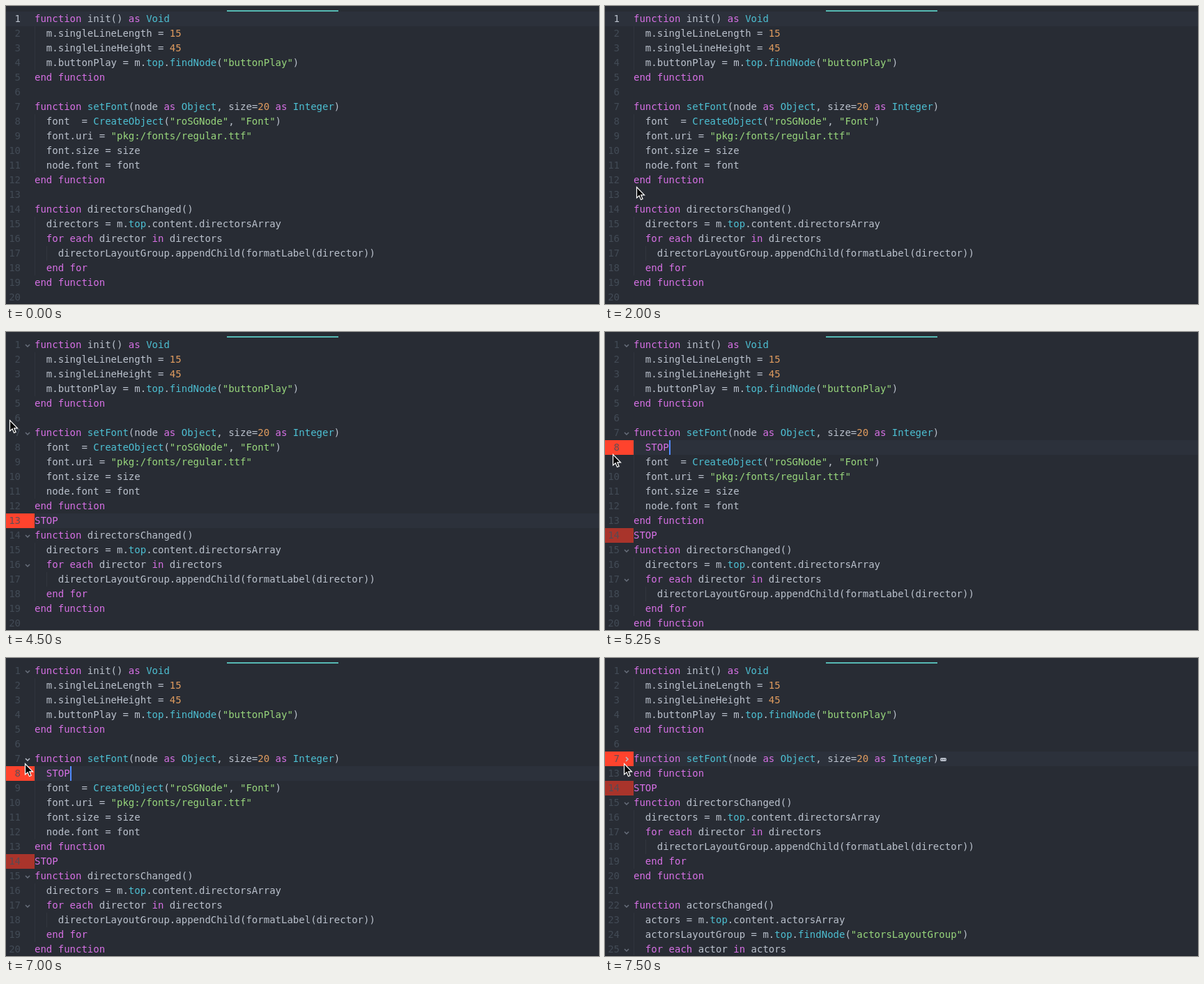
Recreate the animation shown at these times as an HTML page with a canvas. Size 851x427 px, loop 8000 ms.

```html
<!DOCTYPE html>
<html lang="en">
<head>
<meta charset="utf-8">
<title>Editor breakpoints</title>
<style>
  html, body { margin: 0; width: 100%; height: 100%; overflow: hidden; background: #282c34; }
  canvas { display: block; }
</style>
</head>
<body>
<canvas id="stage" width="851" height="427"></canvas>
<script>
const W = 851, H = 427, LOOP = 8000, STEP = 250;
const ROW = 21, TOP = 8, LEFT = 41;
const ctx = document.getElementById('stage').getContext('2d');
const FONT = '14px "DejaVu Sans Mono", monospace';

const color = {
  bg: '#282c34', active: '#2c313b', plain: '#bac1cc', keyword: '#d670e4',
  name: '#4dbfd2', string: '#98d67c', number: '#e09c5f',
  gutter: 'rgba(70,80,92,.85)', guide: 'rgba(171,178,191,.07)',
  fold: '#686f7c', bright: '#b8bec9', stop: '#ff432d', stopDim: '#a9342b',
  caret: '#528bff', tab: '#56b9b3'
};

const source = `function init() as Void
  m.singleLineLength = 15
  m.singleLineHeight = 45
  m.buttonPlay = m.top.findNode("buttonPlay")
end function

function setFont(node as Object, size=20 as Integer)
  font  = CreateObject("roSGNode", "Font")
  font.uri = "pkg:/fonts/regular.ttf"
  font.size = size
  node.font = font
end function

function directorsChanged()
  directors = m.top.content.directorsArray
  for each director in directors
    directorLayoutGroup.appendChild(formatLabel(director))
  end for
end function

function actorsChanged()
  actors = m.top.content.actorsArray
  actorsLayoutGroup = m.top.findNode("actorsLayoutGroup")
  for each actor in actors`.split('\n');

const keywords = new Set('function as end for each in STOP'.split(' '));
const names = new Set('Void top findNode setFont Object Integer CreateObject'.split(' '));

function tokenColor(token) {
  if (token[0] === '"') return color.string;
  if (/^\d+$/.test(token)) return color.number;
  if (keywords.has(token)) return color.keyword;
  return names.has(token) ? color.name : color.plain;
}

// Pointer positions: time, x, y
const moves = [
  [500, 457, 251], [750, 449, 249], [1250, 425, 254], [1500, 250, 270],
  [1750, 95, 268], [2000, 45, 259], [2250, 6, 289], [2500, 7, 281],
  [2750, 7, 275], [4000, 6, 250], [4250, 5, 185], [4500, 5, 126],
  [4750, 8, 152], [5000, 11, 175], [6250, 11, 173], [6500, 15, 168],
  [6750, 22, 158], [7000, 27, 151]
];

function pointerAt(t) {
  let spot = null;
  for (const [at, x, y] of moves) if (t >= at) spot = { x, y };
  return spot;
}

function caretOn(t) {
  const within = (a, b) => t >= a && t < b;
  return within(3000, 3500) || within(4000, 4500) || within(5000, 6000) || within(6500, 7250);
}

// Visible rows and breakpoints at a given time
function editorAt(t) {
  const lines = source.map(text => ({ text }));
  let active = 1;
  if (t >= 2750) {
    lines[12] = { text: 'STOP', stop: true };
    active = 13;
  }
  if (t >= 5250) {
    lines.splice(7, 0, { text: '  STOP', stop: true });
    active = 8;
  }
  lines.forEach((line, i) => { line.no = i + 1; });
  if (t >= 7250) {
    lines.splice(7, 5);
    Object.assign(lines[6], { folded: true, stop: true });
    active = 7;
  }
  return { lines, active };
}

function polyline(points, x, y) {
  ctx.beginPath();
  points.forEach(([px, py]) => ctx.lineTo(x + px, y + py));
}

function drawChevron(y, folded, lit) {
  polyline(folded ? [[-1, -3], [2, 0], [-1, 3]] : [[-3, -1], [0, 2], [3, -1]], 31, y);
  ctx.strokeStyle = lit ? color.bright : color.fold;
  ctx.lineWidth = 1.5;
  ctx.stroke();
}

function drawFoldMark(x, y) {
  ctx.fillStyle = color.bright;
  ctx.beginPath();
  ctx.roundRect(x, y - 2, 9, 5, 2);
  ctx.fill();
  ctx.fillStyle = color.bg;
  for (let i = 0; i < 3; i++) ctx.fillRect(x + 1.5 + i * 2.5, y, 1, 1);
}

function drawPointer({ x, y }) {
  polyline([[0, 0], [0, 15.5], [3.6, 12.2], [6, 18], [8.6, 16.9], [6.2, 11.3], [11, 11.3]], x + .5, y + .5);
  ctx.closePath();
  ctx.fillStyle = '#000';
  ctx.fill();
  ctx.strokeStyle = '#fff';
  ctx.lineWidth = 1.2;
  ctx.stroke();
}

function drawLine(line, y, active, pointer, showFolds, caret, cw) {
  const { text, no, stop, folded } = line;
  const base = y + 15;
  if (active) {
    ctx.fillStyle = color.active;
    ctx.fillRect(0, y, W, ROW);
  }
  if (stop) {
    ctx.fillStyle = active ? color.stop : color.stopDim;
    ctx.fillRect(0, y, LEFT, ROW);
  }

  ctx.fillStyle = active && !stop ? color.plain : color.gutter;
  ctx.textAlign = 'right';
  ctx.fillText(no, 21, base);
  ctx.textAlign = 'left';

  const indent = text.search(/\S|$/);
  ctx.fillStyle = color.guide;
  for (let col = 0; col < indent; col += 2) {
    ctx.fillRect(Math.round(LEFT + col * cw), y, 1, ROW);
  }

  let col = 0;
  for (const token of text.match(/"[^"]*"|\w+|[^\w"]+/g) || []) {
    ctx.fillStyle = tokenColor(token);
    ctx.fillText(token, LEFT + col * cw, base);
    col += token.length;
  }
  const end = LEFT + col * cw;

  if (showFolds && /^\s*(function|for) /.test(text)) {
    const hover = pointer && pointer.x > 24 && pointer.x < LEFT && pointer.y >= y && pointer.y < y + ROW;
    drawChevron(y + 11, folded, hover || folded);
  }
  if (folded) drawFoldMark(Math.round(end) + 2, y + 11);
  if (caret && active && stop) {
    ctx.fillStyle = color.caret;
    ctx.fillRect(Math.round(end), y, 2, ROW);
  }
}

function draw(t) {
  const { lines, active } = editorAt(t);
  const pointer = pointerAt(t);
  ctx.fillStyle = color.bg;
  ctx.fillRect(0, 0, W, H);
  ctx.font = FONT;
  const cw = ctx.measureText('0').width;
  lines.slice(0, 20).forEach((line, i) => {
    drawLine(line, TOP + i * ROW, line.no === active, pointer, t >= 2250, caretOn(t), cw);
  });
  ctx.fillStyle = color.tab;
  ctx.fillRect(317, 6, 160, 2);
  ctx.fillStyle = '#21252b';
  ctx.fillRect(0, H - 1, W, 1);
  if (pointer) drawPointer(pointer);
}

const start = performance.now();
function tick() {
  const t = (performance.now() - start) % LOOP;
  draw(Math.floor(t / STEP) * STEP);
  requestAnimationFrame(tick);
}
tick();
</script>
</body>
</html>
```
